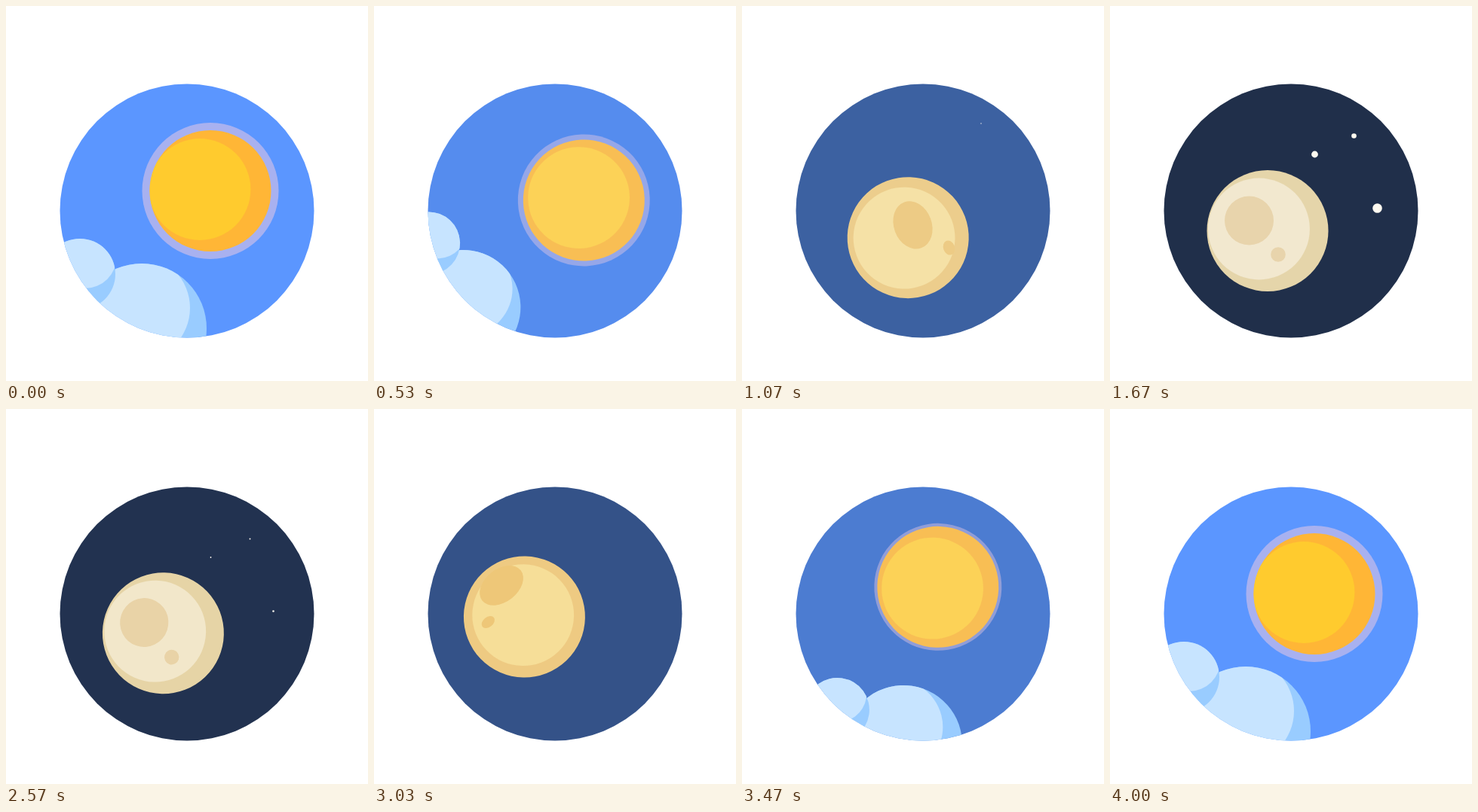
These frames come from a looping animation (480x498 px, 4.81 s). An HTML page with a canvas:

```html
<!DOCTYPE html>
<html lang="en">
<head>
<meta charset="utf-8">
<title>Day and night</title>
<style>
  html, body { margin: 0; width: 100%; height: 100%; overflow: hidden; background: #fff; }
  canvas { display: block; width: 480px; height: 498px; }
</style>
</head>
<body>
<canvas id="stage" width="480" height="498"></canvas>
<script>
const ctx = document.getElementById('stage').getContext('2d');
const LOOP = 4810, TURN = 1600, DAWN = 2400;
const RAD = Math.PI / 180;

const clamp = x => Math.min(1, Math.max(0, x));
const smooth = x => x * x * (3 - 2 * x);
const mix = (a, b, k) => a + (b - a) * k;
const span = (t, from, to) => clamp((t - from) / (to - from));
const rgb = c => `rgb(${c.map(Math.round)})`;
const blend = (a, b, k) => rgb(a.map((v, i) => mix(v, b[i], k)));

function bezier(x1, y1, x2, y2) {
  const at = (a, b, s) => 3 * a * s * (1 - s) ** 2 + 3 * b * s * s * (1 - s) + s ** 3;
  return x => {
    let lo = 0, hi = 1;
    for (let i = 0; i < 24; i++) {
      const mid = (lo + hi) / 2;
      if (at(x1, x2, mid) < x) lo = mid; else hi = mid;
    }
    return at(y1, y2, (lo + hi) / 2);
  };
}
const swing = bezier(.755, 0, .245, 1);
const dusk = bezier(.68, 0, .72, .95);

const COLOR = {
  sky: [[91, 150, 255], [32, 47, 74]],
  rim: [[255, 182, 54], [229, 213, 170]],
  face: [[255, 203, 46], [242, 232, 207]],
  crater: [[250, 175, 20], [232, 212, 172]]
};
const tint = (name, k) => blend(...COLOR[name], k);

// x, y, radius, arrival start and end, departure start
const STARS = [
  [31.5, -75, 4.4, 1150, 1670, 2200],
  [83.5, -99.5, 3.3, 1020, 1520, 2260],
  [114.5, -3.5, 6.3, 1090, 1600, 2230]
];
// x, y, radius, then the lit disc inside
const CLOUDS = [
  [-60, 156, 86, -66, 129, 70],
  [-142, 84, 47, -135.3, 61, 42]
];
const CRATERS = [
  { x: 24.5, y: 13.5, r: 32.5, enter: -320, leave: 125, rise: 17 },
  { x: -14, y: -31.5, r: 9.8, enter: -285, leave: 255, rise: -9 }
];

function disc(x, y, r, fill) {
  ctx.beginPath();
  ctx.arc(x, y, Math.max(0, r), 0, 2 * Math.PI);
  ctx.fillStyle = fill;
  ctx.fill();
}

function clipped(x, y, r, paint) {
  ctx.save();
  ctx.beginPath();
  ctx.arc(x, y, r, 0, 2 * Math.PI);
  ctx.clip();
  paint();
  ctx.restore();
}

function drawStars(t) {
  for (const [x, y, r, from, to, away] of STARS) {
    const grow = smooth(span(t, from, to));
    const size = grow * (1 - smooth(span(t, away, away + 480)));
    if (size > 0) disc(x - 6.7 * (1 - grow), y - 17 * (1 - grow), r * Math.max(size, .2), '#fffaf0');
  }
}

function drawClouds(night, rising) {
  ctx.save();
  const far = night * night;
  if (rising) {
    ctx.translate(-224 * far, 284 * far);
    ctx.rotate(25 * RAD * night);
  } else {
    ctx.translate(-249 * far, 371 * far);
  }
  const size = 1 - (rising ? .37 : .45) * night;
  ctx.scale(size, size);
  for (const [x, y, r, lx, ly, lr] of CLOUDS) {
    disc(x, y, r, '#99ccff');
    clipped(x, y, r, () => disc(lx, ly, lr, '#c7e4ff'));
  }
  ctx.restore();
}

function drawCraters(night, turn, rising) {
  const shift = rising ? turn : 1 - turn;
  const squash = 1 - (rising ? 1.7 : 2) * shift;
  if (squash <= 0) return;
  for (const c of CRATERS) {
    ctx.save();
    ctx.translate(c.x + shift * (rising ? c.leave : c.enter), c.y + (rising ? shift * c.rise : 0));
    if (rising) ctx.rotate(17 * RAD);
    ctx.scale(squash, 1);
    disc(0, 0, c.r, tint('crater', night));
    ctx.restore();
  }
}

function drawOrb(t, night, turn, rising) {
  ctx.save();
  ctx.translate(31, -26.5);
  const shrink = rising
    ? 1 - smooth(span(t, DAWN + 500, DAWN + TURN))
    : smooth(span(t, 150, 1350));
  ctx.globalAlpha = .5 - .4 * night;
  disc(0, 0, 90.5 - 12.7 * shrink, 'rgb(246,206,225)');
  ctx.globalAlpha = 1;
  disc(0, 0, 80.5, tint('rim', night));
  clipped(0, 0, 80.5, () => {
    disc(mix(-14, 11.5, night), mix(-2, 2.5, night), 67.4, tint('face', night));
    drawCraters(night, turn, rising);
  });
  ctx.restore();
}

function draw(t) {
  const rising = t >= DAWN;
  const u = clamp((rising ? t - DAWN : t) / TURN);
  const turn = swing(u);
  const night = rising ? 1 - smooth(u) : smooth(u);

  ctx.fillStyle = '#fff';
  ctx.fillRect(0, 0, 480, 498);
  ctx.save();
  ctx.translate(240, 272);
  disc(0, 0, 168.5, tint('sky', rising ? night : dusk(u)));
  clipped(0, 0, 168.5, () => {
    drawStars(t);
    ctx.rotate(Math.PI * (turn + (rising ? 1 : 0)));
    drawOrb(t, night, turn, rising);
    drawClouds(night, rising);
  });
  ctx.restore();
}

let start;
function tick(now) {
  start ??= now;
  draw((now - start) % LOOP);
  requestAnimationFrame(tick);
}
draw(0);
requestAnimationFrame(tick);
</script>
</body>
</html>
```
